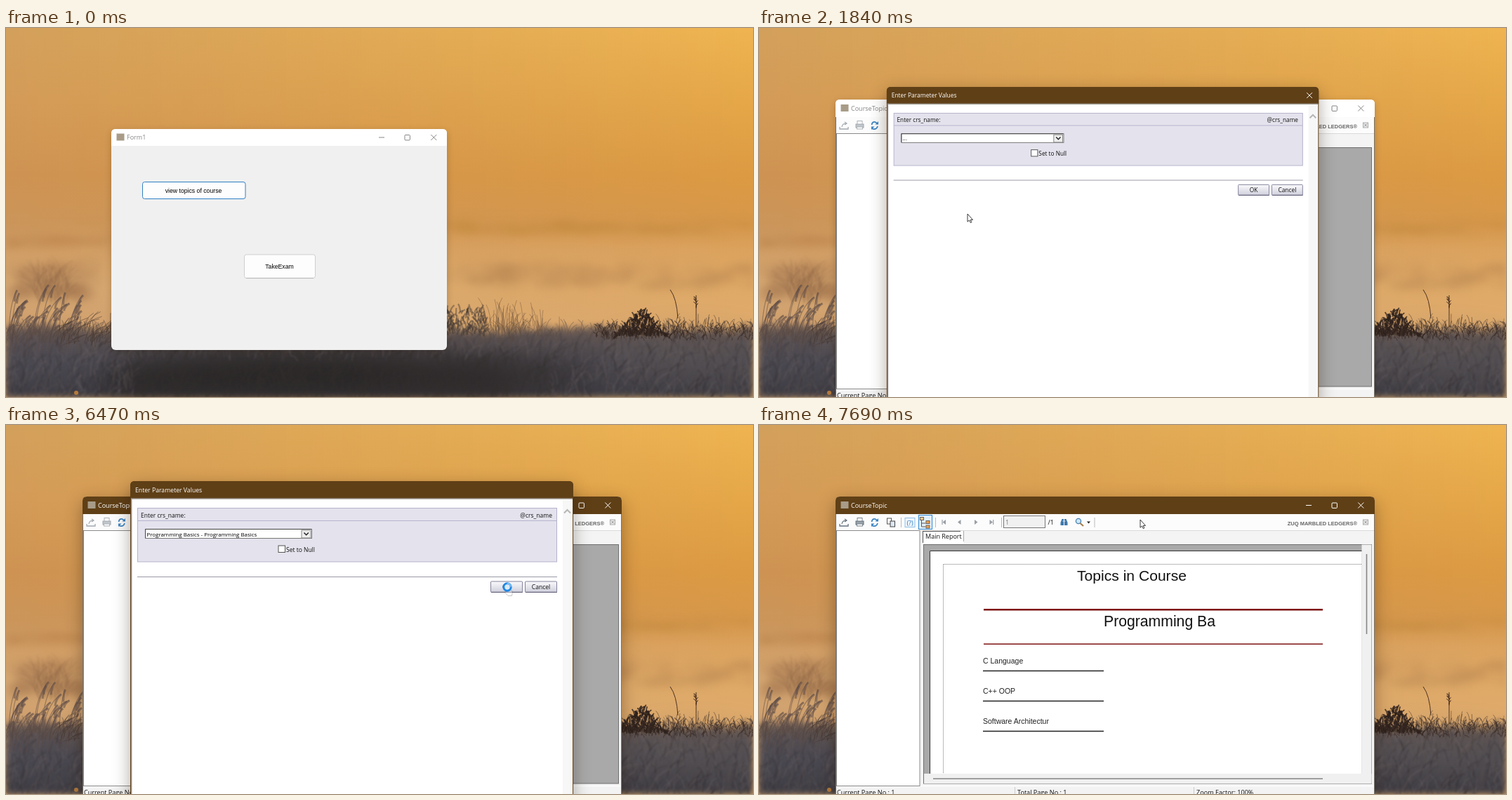
These frames come from a looping animation (1064x526 px, 8.69 s). An HTML page with a canvas:

```html
<!DOCTYPE html>
<html lang="en">
<head>
<meta charset="utf-8">
<title>Course topics</title>
<style>
  html, body { margin: 0; width: 100%; height: 100%; overflow: hidden; background: #d39b55; }
  canvas, svg { position: absolute; left: 0; top: 0; width: 1064px; height: 526px; }
  text { font-family: "Open Sans", "Noto Sans", sans-serif; white-space: pre; }
  .arial { font-family: "Liberation Sans", Arial, sans-serif; }
  .window { --bar: #fff; --ink: #858585; }
  .window.active { --bar: #5f3f16; --ink: #fff; }
  .shade { filter: drop-shadow(0 3px 5px rgba(30, 15, 0, .24)); }
  .active .shade { filter: drop-shadow(0 7px 12px rgba(30, 15, 0, .36)); }
</style>
</head>
<body>
<canvas id="scene" width="1064" height="526"></canvas>
<svg id="stage" viewBox="0 0 1064 526"></svg>
<script>
const LOOP = 8690;
const $ = id => document.getElementById(id);
const lerp = (a, b, k) => a + (b - a) * k;
const clamp = (v, lo, hi) => Math.min(hi, Math.max(lo, v));

// ---------- landscape ----------
function paintScene() {
  const scene = $('scene').getContext('2d');
  let c = scene, seed = 91;
  const rnd = (a = 0, b = 1) => {
    seed = (seed * 1664525 + 1013904223) % 4294967296;
    return a + (b - a) * seed / 4294967296;
  };
  const pick = list => list[Math.floor(rnd(0, list.length))];
  const repeat = (n, paint) => { for (let i = 0; i < n; i++) paint(i); };
  const rgb = hex => [1, 3, 5].map(i => parseInt(hex.slice(i, i + 2), 16));

  // Paints on a separate canvas, then lays it over the scene out of focus.
  function layer(blur, paint) {
    const sheet = document.createElement('canvas');
    sheet.width = 1064;
    sheet.height = 526;
    c = sheet.getContext('2d');
    paint();
    scene.filter = `blur(${blur}px)`;
    scene.drawImage(sheet, 0, 0);
    scene.filter = 'none';
    c = scene;
  }
  function blend(x0, y0, x1, y1, stops) {
    const g = c.createLinearGradient(x0, y0, x1, y1);
    stops.forEach(([at, color]) => g.addColorStop(at, color));
    return g;
  }
  function blob(x, y, rx, ry, color) {
    c.fillStyle = color;
    c.beginPath();
    c.ellipse(x, y, rx, ry, 0, 0, 7);
    c.fill();
  }
  function blade(x, y, len, lean, color, width) {
    c.strokeStyle = color;
    c.lineWidth = width;
    c.beginPath();
    c.moveTo(x, y);
    c.quadraticCurveTo(x + lean * .15, y - len * .7, x + lean, y - len);
    c.stroke();
  }

  const stops = [0, .2, .4, .53, .6, .7, .82];
  const west = ['#d3a05b', '#d39b57', '#ce9352', '#cb955a', '#d09d65', '#d4a670', '#cfa06f'].map(rgb);
  const east = ['#efb451', '#e5a748', '#dc9a42', '#d6974a', '#dba25d', '#dfa966', '#dfab6e'].map(rgb);
  for (let x = 0; x < 1064; x++) {
    c.fillStyle = blend(0, 0, 0, 526, stops.map((s, i) =>
      [s, `rgb(${west[i].map((v, j) => Math.round(lerp(v, east[i][j], x / 1064)))})`]));
    c.fillRect(x, 0, 1, 526);
  }

  // trees dissolving in the mist
  layer(5, () => {
    repeat(60, () => blob(rnd(640, 1080), rnd(278, 292), rnd(15, 35), rnd(5, 9), 'rgba(186,128,62,.09)'));
    repeat(40, () => blob(rnd(-10, 150), rnd(298, 310), rnd(15, 30), rnd(4, 8), 'rgba(176,124,80,.07)'));
    repeat(90, () => blob(rnd(640, 1080), rnd(338, 368), rnd(12, 28), rnd(6, 12), 'rgba(176,124,76,.1)'));
    repeat(50, () => blob(rnd(10, 125), rnd(338, 385), rnd(10, 24), rnd(8, 14), 'rgba(140,102,72,.09)'));
  });
  layer(.8, () => repeat(160, () =>
    blade(rnd(40, 90), rnd(360, 395), rnd(15, 38), rnd(-28, 28), 'rgba(125,92,68,.2)', .8)));

  // ground: hazy rim, cool on both sides, dark in the middle
  layer(4, () => {
    c.fillStyle = blend(0, 418, 0, 526, [[0, '#8b6d56'], [.2, '#5f5453'], [.5, '#4d4a50'], [1, '#3d3b42']]);
    c.beginPath();
    c.moveTo(-20, 560);
    for (let x = -20; x <= 1084; x += 8) c.lineTo(x, 430 + 3 * Math.sin(x / 47) + rnd(-5, 5) - (x < 120 ? 8 : 0));
    c.lineTo(1084, 560);
    c.fill();
  });
  layer(22, () => {
    blob(430, 505, 300, 45, 'rgba(35,31,30,.85)');
    blob(680, 495, 160, 30, 'rgba(45,40,40,.6)');
    blob(980, 470, 120, 28, 'rgba(98,90,88,.4)');
    blob(50, 480, 110, 25, 'rgba(72,72,84,.4)');
  });
  const tones = ['52,48,50', '74,72,80', '92,89,97', '108,99,99', '94,82,76', '50,47,50'];
  layer(1, () => repeat(2600, () => {
    const x = rnd(-20, 1084), y = rnd(444, 550);
    const dark = x > 180 && x < 780 && y > 475;
    blade(x, y, rnd(8, 28), rnd(-12, 20), `rgba(${dark ? '54,49,48' : pick(tones)},.3)`, rnd(1, 2.4));
  }));
  layer(.7, () => {
    repeat(700, () => blade(rnd(-10, 1074), rnd(430, 450), rnd(6, 20), rnd(-9, 12), 'rgba(92,76,68,.35)', 1.2));
    // tall reeds on the left
    repeat(42, () => {
      const x = rnd(-20, 95), y = rnd(430, 470), len = rnd(25, 68), lean = rnd(8, 28);
      blade(x, y, len, lean, 'rgba(88,72,68,.5)', 1.1);
      blade(x + lean * .7, y - len * .72, len * .28, lean * .35, 'rgba(96,79,73,.55)', 3);
    });
    repeat(80, () => blade(rnd(65, 150), rnd(428, 455), rnd(6, 26), rnd(-5, 28), 'rgba(70,56,50,.5)', 1));
    repeat(140, () => blade(rnd(625, 685), rnd(405, 440), rnd(4, 12), rnd(-8, 8), 'rgba(74,61,56,.45)', 2.2));
  });
  // fine grass and the shrub on the right
  layer(.3, () => {
    repeat(70, () => blade(rnd(682, 765), rnd(425, 440), rnd(8, 42), rnd(-14, 14), 'rgba(98,74,54,.5)', .8));
    repeat(240, () => {
      const d = (rnd(-1, 1) + rnd(-1, 1)) / 2;
      blade(905 + d * 42, rnd(402 + Math.abs(d) * 45, 440), rnd(3, 9), rnd(-6, 6), 'rgba(46,34,29,.8)', 1.8);
    });
    repeat(280, () => blade(rnd(840, 1070), rnd(426, 446), rnd(3, 13), rnd(-8, 8), 'rgba(58,44,38,.55)', 1.3));
    repeat(40, () => blade(rnd(860, 1060), rnd(420, 435), rnd(6, 18), rnd(-7, 7), 'rgba(58,42,34,.6)', .8));
    blade(957, 414, 41, -11, '#4a3020', 1);
    blade(983, 426, 45, 0, '#4a3020', 1);
    repeat(10, () => blade(983, rnd(384, 400), 4, rnd(-4, 4), '#4a3020', 1));
    blob(100, 520, 3, 3, '#b57a3c');
  });
}

// ---------- SVG helpers ----------
const rect = (x, y, w, h, fill, stroke = 'none', more = '') =>
  `<rect x="${x}" y="${y}" width="${w}" height="${h}" style="fill:${fill};stroke:${stroke}" ${more}/>`;
const line = (d, stroke, width = 1, more = '') =>
  `<path d="${d}" style="fill:none;stroke:${stroke};stroke-width:${width}" ${more}/>`;
const shape = (d, fill) => `<path d="${d}" style="fill:${fill}"/>`;
const text = (x, y, size, str, fill = '#111', more = '') =>
  `<text x="${x}" y="${y}" style="font-size:${size}px;fill:${fill}" ${more}>${str}</text>`;
const group = (id, body, more = '') => `<g id="${id}" ${more}>${body}</g>`;
const middle = 'text-anchor="middle"', end = 'text-anchor="end"', arial = 'class="arial"';

const titleBar = (x, y, w, h) =>
  shape(`M${x} ${y + h}v${6 - h}q0 -6 6 -6h${w - 12}q6 0 6 6v${h - 6}z`, 'var(--bar)');
const cross = (x, y) => line(`M${x} ${y}l8 8m0 -8l-8 8`, 'var(--ink)');
const captionButtons = (x, y) => line(`M${x} ${y + 4}h8`, 'var(--ink)') +
  rect(x + 37, y + .5, 7.4, 7.4, 'none', 'var(--ink)', 'rx="1"') + cross(x + 74.3, y);
const appIcon = (x, y) => rect(x, y, 11, 10, '#a89c88');

const formWindow = () =>
  rect(150, 144, 478, 315, '#f0f0f0', 'none', 'rx="6" class="shade"') + titleBar(150, 144, 478, 24) +
  appIcon(157.5, 150.5) + text(172, 159.3, 9, 'Form1', 'var(--ink)') + captionButtons(531, 152) +
  rect(194.5, 219.5, 146.5, 24, '#fdfdfd', '#2f7fc4', 'rx="3" id="viewButton"') +
  text(267, 235, 8.7, 'view topics of course', '#000', `${middle} ${arial}`) +
  rect(339.5, 323, 101, 33.5, '#fdfdfd', '#cfcfcf', 'rx="3"') + line('M342 356.6h96', '#b5b5b5') +
  text(389.5, 343.3, 8.7, 'TakeExam', '#000', `${middle} ${arial}`);

const search = () =>
  shape('M415 143v-4l2 -5h2.5v9zM420.500 143v-9h2.500l2 5v4z', '#3f78ad') +
  line('M418 137h4', '#cfe2f2') +
  `<circle cx="440.500" cy="137" r="3.600" style="fill:#cfe6f7;stroke:#4583b8;stroke-width:1.300"/>` +
  line('M443 140l4.500 4', '#a37a45', 2) + shape('M452.500 137.500h5l-2.500 3z', '#222') +
  line('M463.500 132v14', '#bbb');

const toolbar = () =>
  group('fileTools', line('M115 141v3h12v-3', '#66717d', 1.3) + line('M118 141q1 -5 6 -5m-2 -2l3 2l-3 2', '#66717d', 1.2) +
    rect(138, 137, 11, 5, '#9aa3ab', '#66717d') + rect(140, 132.500, 7, 4.500, '#fff', '#7a848d') + rect(139.500, 141, 8, 3, '#fff', '#7a848d')) +
  line('M160.500 138q1 -5 5 -4l3 2m-8 7l2 1q5 1 6.500 -4', '#3b83c2', 1.7) + shape('M170 133v4.500h-4.500zM160 145v-4.500h4.500z', '#3b83c2') +
  rect(182.500, 133, 6, 8, '#fff', '#555') + rect(187, 137, 6.500, 8, '#dce8f3', '#444') +
  line('M202.500 132v14M251.500 132v14M345.500 132v14', '#bbb') +
  rect(208, 132.500, 14, 13, '#eef6fd', '#8fbfe6') + text(215, 142.500, 9, '(?)', '#2a78bd', middle) +
  rect(227.500, 128.500, 19, 20, '#e2f0fb', '#2f86cf') + line('M231.500 136v9h6m-6 -5h6', '#555') +
  rect(229.500, 131.500, 5, 4, '#f6ca8b', '#666') + rect(238, 136.500, 5, 4, '#f1a04c', '#666') + rect(238, 143, 5, 4, '#f1a04c', '#666') +
  shape('M266 135v7l-4.500 -3.500zM287.500 135v7l-4.500 -3.500zM307 135v7l4.500 -3.500zM328.500 135v7l4.500 -3.500z', '#9a9fa5') +
  line('M261 135v7M333.700 135v7', '#9a9fa5', 1.2) +
  rect(348.500, 129.500, 59, 17, '#f1f1f1', '#777') +
  group('pageNumber', text(351, 141.500, 9, '1', '#777') + text(411.500, 142, 9, '/1')) +
  group('searchTools', search()) +
  text(852, 142.500, 7.5, 'ZUQ MARBLED LEDGERS®', '#666', `${end} class="arial" font-weight="bold"`) +
  rect(860.500, 135, 7, 7, '#eee', '#aaa') + line('M862 136.500l4 4m0 -4l-4 4', '#888');

function waitBox() {
  const tones = ['#4c4f55', '#6d8fb5', '#9b8a72', '#d8d8d8', '#e9dfcf', '#eee', '#c3c9cf', '#74664f'];
  const wedges = tones.map((tone, i) => `<path d="M-1.900 -4L-2.700 -8Q0 -9 2.700 -8L1.500 -4z" transform="rotate(${i * 45})" fill="${tone}"/>`);
  return rect(428.500, 283.500, 131, 51, '#fbfbfb', '#e2e2e2', 'stroke-width="2"') + group('spinner', wedges.join('')) +
    text(493, 316, 8.6, 'Please wait while the', '#222', middle) +
    text(493, 326.500, 8.6, 'document is processing.', '#222', middle);
}

const report = () =>
  rect(858.500, 170.500, 14, 340, '#f0f0f0') + rect(235, 497, 637.500, 14, '#f0f0f0') +
  line('M865.500 184v114M248 504.200h555', '#858585', 1.6) +
  rect(243, 179, 615.500, 318, '#fff') + line('M858.500 179.500H243.500V497', '#333') +
  line('M858 198.500H262.500V497', '#777', 1, 'stroke-dasharray="1 1"') +
  text(453, 222, 21.1, 'Topics in Course', '#111', arial) + text(491, 287, 21.2, 'Programming Ba', '#111', arial) +
  line('M320 263.300H803', '#7f1212', 2.4) + line('M320 312.300H803', '#7f1212', 1.6) +
  ['C Language', 'C++ OOP', 'Software Architectur'].map((name, i) =>
    text(319, 339.700 + 43 * i, 10.5, name, '#222', arial) + line(`M319 ${350.500 + 43 * i}H491`, '#222', 1.7)).join('');

const courseWindow = () =>
  rect(109, 102, 768, 430, '#fcfcfc', 'none', 'rx="6" class="shade"') + titleBar(109, 102, 768, 25) +
  appIcon(116.500, 109) + text(131, 118, 9, 'CourseTopic', 'var(--ink)') + captionButtons(779, 110.500) +
  toolbar() + line('M109.500 127V530M876.500 127V530', '#77736c') + line('M110 150.500H876', '#dadada') +
  rect(229, 151, 647, 363, '#f4f4f4') + rect(110.500, 150.500, 118.500, 364, '#fff', '#8a8a8a') +
  rect(233, 151, 58, 18, '#fff') + line('M233 151.500h54M233.500 151v17', '#555') + line('M291.500 151v15', '#aaa') +
  text(237, 162, 9, 'Main Report') +
  rect(234.500, 170.500, 638, 340.500, '#a9a9a9', '#6f6f6f') +
  group('wait', waitBox()) + group('report', report()) +
  rect(110, 515.500, 766, 16, '#f3f3f3') + line('M364.500 516v15M619.500 516v15', '#ccc') +
  text(111, 527, 9.1, 'Current Page No.: 1') + text(368, 527, 9.1, 'Total Page No.: 1+', '#111', 'id="total"') +
  text(623, 527, 9.1, 'Zoom Factor: 100%');

const courses = ['.NET Core', 'Advanced CST', 'CST', 'Programming Basics', 'SQL'];
const options = ['...', ...courses.map(name => `${name} - ${name}`)];
const ROW = 10.4, OPTION_SIZE = 7.9;
const pushButton = (x, label) => rect(x + .5, 223, 45, 15.500, 'url(#metal)', '#83839c', 'rx="1"') +
  line(`M${x + 1} 238.300h45`, '#5d5d74') + text(x + 23, 234, 8.6, label, '#111', middle);

const dialogWindow = () =>
  rect(177, 80, 631, 465, '#5f3f16', 'none', 'rx="6" class="shade"') + titleBar(177, 80, 631, 25) +
  rect(178.500, 105, 628.500, 440, '#fff') + line('M807 105H178.700V545', '#99938a', 1.4) +
  text(184, 95.800, 8.7, 'Enter Parameter Values', 'var(--ink)') + group('dialogClose', cross(790.500, 88.500)) +
  rect(793, 107, 13, 430, '#f7f7f7') + line('M795 125.500l4.500 -4.500l4.500 4.500', '#b5b5b5', 2) +
  rect(187.500, 118.500, 597, 76.500, '#e4e3ed', '#b4b3cc') + line('M187.500 136.500h597', '#b4b3cc') +
  text(192, 131.500, 8.5, 'Enter crs_name:') + text(778, 131.500, 8.5, '@crs_name', '#111', end) +
  rect(198.500, 148.500, 237, 13, '#fff', '#777') + line('M198.500 161V148.500H435', '#444') +
  rect(421, 150, 13, 11, '#eee', '#888') + line('M424.500 153.500l3.200 3.200l3.200 -3.200', '#222', 1.5) +
  text(200.500, 158.500, OPTION_SIZE, '', '#000', 'id="choice"') +
  rect(388, 172, 9.500, 9.500, '#fff', '#555') + text(399, 181, 8.5, 'Set to Null') +
  line('M187 216.500H785', '#9a9aa6') + pushButton(690, 'OK') + pushButton(739, 'Cancel') +
  group('list', rect(198.500, 147.500, 238, 66, '#fff', '#333') + rect(199, 150, 237, ROW, '#0078d7') +
    rect(199, 0, 237, ROW, '#000', 'none', 'id="hover"') +
    options.map((o, i) => text(201, 158.200 + ROW * i, OPTION_SIZE, o, '#000', 'class="option"')).join(''));

const pointer = () =>
  `<circle id="click" cy="3" r="9.500" fill="#f5dc1c" fill-opacity=".85"/>` +
  `<path id="arrow" d="M0 0V11.200L2.500 9L4.300 12.600L5.900 11.800L4.200 8.400H7.500Z" fill="#fff" stroke="#222" stroke-width=".9"/>` +
  `<path id="hand" d="M0 1a1.300 1.300 0 0 1 2.600 0V6L7 7Q8.500 7.500 8.300 9.500L7.500 14.500H2L-2.500 9.500Q-2.600 7.800 -1 8.200L0 9Z" fill="#fff" stroke="#333" stroke-width=".8"/>` +
  group('busy', `<circle r="5.200" fill="#dcecf8" stroke="#1e88e5" stroke-width="3"/>` +
    `<path d="M0 -5.200A5.200 5.200 0 0 1 5.200 0" fill="none" stroke="#7fc0f5" stroke-width="2"/>`);

paintScene();
$('stage').innerHTML =
  `<defs><linearGradient id="metal" x2="0" y2="1"><stop stop-color="#fafafc"/><stop offset="1" stop-color="#cfcfdc"/></linearGradient></defs>` +
  group('form', formWindow(), 'class="window"') + group('course', courseWindow(), 'class="window"') +
  group('dialog', dialogWindow(), 'class="window active"') + group('pointer', pointer());

// ---------- motion ----------
const ease = k => k * k * (3 - 2 * k);
// Rows are [time, ...values]; values are held outside the table.
function track(rows, t, curve = k => k) {
  const next = rows.findIndex(row => row[0] > t);
  if (next === 0) return rows[0].slice(1);
  if (next < 0) return rows[rows.length - 1].slice(1);
  const a = rows[next - 1], b = rows[next], k = curve((t - a[0]) / (b[0] - a[0]));
  return a.slice(1).map((v, i) => lerp(v, b[i + 1], k));
}
const within = (t, ...spans) => spans.some(([from, to]) => t >= from && t < to);
const show = (id, on) => $(id).style.display = on ? '' : 'none';

const pointerPath = [
  [60, 312, 302], [440, 226, 231], [1480, 226, 231], [1840, 297, 265], [2260, 297, 265],
  [2860, 428, 154], [3160, 428, 154], [3750, 292, 191.5], [5330, 292, 193], [6100, 713, 229]];
const leavePath = [
  [7170, 714, 231], [7260, 700, 262], [7350, 650, 303], [7450, 540, 262], [7540, 453, 190], [7690, 543, 135]];
// scale, opacity
const courseOpen = [[1130, .85, 0], [1200, .867, .2], [1270, .94, .65], [1340, .975, 1], [1470, 1, 1]];
const dialogOpen = [[1640, .85, 0], [1700, .867, .2], [1770, .94, .7], [1840, .975, 1], [1930, .993, 1], [2020, 1, 1]];
const dialogShut = [[6580, 1, 1], [6610, .985, .6], [6670, .951, .2], [6730, .93, 0]];

function pose(id, [scale, opacity], x, y) {
  show(id, opacity > 0);
  $(id).setAttribute('opacity', opacity);
  $(id).setAttribute('transform', `translate(${x} ${y}) scale(${scale}) translate(${-x} ${-y})`);
}

function render(t) {
  $('form').classList.toggle('active', within(t, [750, 1060]));
  const hovered = t > 400, pressed = within(t, [750, 1060]);
  $('viewButton').style.fill = pressed ? '#cce4f7' : hovered && t < 1060 ? '#e3f0fa' : '#fdfdfd';
  $('viewButton').style.stroke = t >= 1060 ? '#4a5a66' : '#2f7fc4';

  pose('course', track(courseOpen, t), 365, 252);
  $('course').classList.toggle('active', !within(t, [1660, 6470]));
  if (t < 6000) pose('dialog', track(dialogOpen, t), 374, 237);
  else pose('dialog', track(dialogShut, t), 442, 304);
  show('dialogClose', t < 6470);

  const done = t >= 7110;
  show('report', done);
  show('wait', !done);
  show('pageNumber', done);
  $('fileTools').setAttribute('opacity', done ? 1 : .6);
  $('searchTools').setAttribute('transform', `translate(${done ? 14.500 : 0} 0)`);
  $('total').textContent = 'Total Page No.: 1' + (done ? '' : '+');
  $('spinner').setAttribute('transform', `translate(495 301.500) rotate(${Math.floor(t / 65) * 45 % 360})`);

  const [x, y] = t < 7170 ? track(pointerPath, t, ease) : track(leavePath, t);
  const row = t > 3160 ? clamp(Math.floor((y - 150) / ROW), 0, 4) : 0;
  show('list', within(t, [2980, 4750]));
  show('hover', row > 0);
  $('hover').setAttribute('y', 150 + ROW * row);
  document.querySelectorAll('.option').forEach((o, i) => o.style.fill = !i || i === row ? '#fff' : '#000');
  $('choice').textContent = options[t < 4750 ? 0 : 4];

  const busy = within(t, [6470, 7170]), onButton = within(t, [5330, 6600]) && x > 692;
  $('pointer').setAttribute('transform', `translate(${x} ${y})`);
  show('pointer', t >= 60);
  show('arrow', !busy && !onButton);
  show('hand', onButton);
  $('hand').setAttribute('opacity', busy ? .35 : 1);
  show('busy', busy);
  $('busy').setAttribute('transform', `translate(1 2) rotate(${t * .5 % 360})`);
  show('click', within(t, [750, 820], [2860, 2980], [4630, 4750], [6350, 6470]));
}

const start = performance.now();
function tick() {
  render((performance.now() - start) % LOOP);
  requestAnimationFrame(tick);
}
tick();
</script>
</body>
</html>
```
